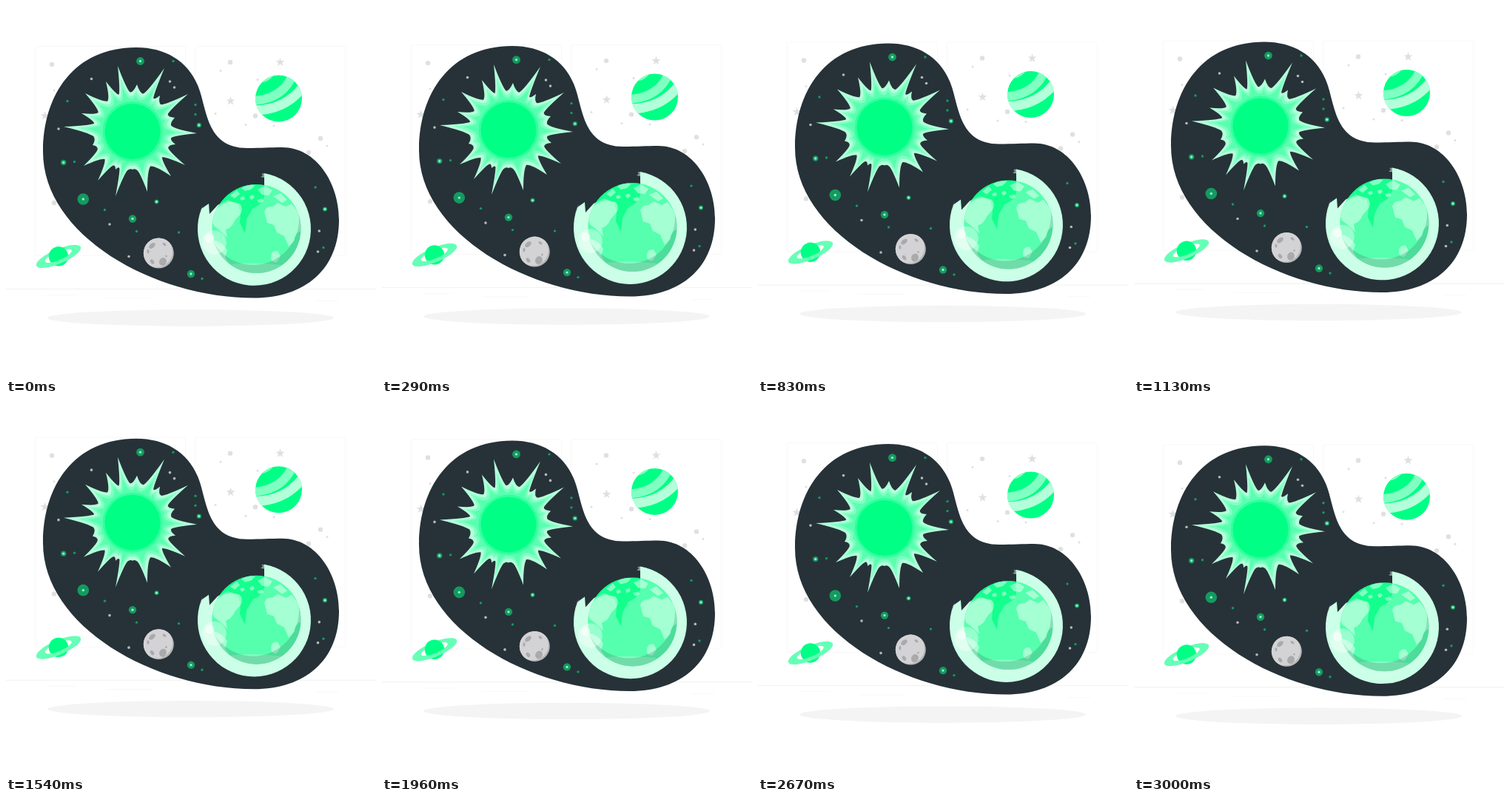
An HTML page that plays this animation: 500 px wide and 500 px high, repeating every 3040 ms.

```html
<!DOCTYPE html>
<html lang="en">
<head>
<meta charset="utf-8">
<title>Floating space scene</title>
<style>
html, body { margin: 0; width: 100%; height: 100%; overflow: hidden; background: #fff; }
svg { display: block; width: 100vw; height: 100vh; }
</style>
</head>
<body>
<svg viewBox="0 0 500 500">
  <defs>
    <clipPath id="earthClip"><circle cx="338.5" cy="301" r="60"/></clipPath>
    <clipPath id="planetClip"><circle cx="368.5" cy="125" r="31.5"/></clipPath>
    <clipPath id="moonClip"><circle cx="206.3" cy="334" r="20.5"/></clipPath>
    <clipPath id="frontClip"><rect x="-40" y="0" width="80" height="20"/></clipPath>
    <path id="glass" d="M264 274L274 267L275 281L286 269L300 262L314 268L317 280L316 293L323 307L325 288L333 274L343 268L349 258V226A76.5 76.5 0 1 1 264 274Z"/>
    <path id="ring" fill-rule="evenodd" d="M-32.5 0A32.5 9.7 0 1 1 32.5 0A32.5 9.7 0 1 1 -32.5 0ZM-19.5 -.5A19.5 5.6 0 1 0 19.5 -.5A19.5 5.6 0 1 0 -19.5 -.5Z"/>
  </defs>
  <g id="scene">
    <g fill="none" stroke="#f8f8f8">
      <rect x="39.5" y="54.5" width="203" height="283" rx="2"/>
      <rect x="255.5" y="54.5" width="203" height="283" rx="2"/>
      <path d="M0 382.5H500" stroke="#f0f0f0"/>
      <path d="M55 390.5H97M135 394.8H198M418 398.3H449"/>
    </g>
    <ellipse cx="249.5" cy="421.5" rx="193.5" ry="11.2" fill="#f4f4f4"/>
    <g id="pale" fill="#e0e0e0"></g>

    <path fill="#263238" d="M176 56C215 56 245 74 259 107C272 137 269 192 326 192C345 192 357 191 373 191C420 191 450 240 450 289C450 355 405 394.5 335 394.5C200 394.5 50 310 50 197C50 120 92 56 176 56Z"/>
    <g id="stars"></g>
    <g id="sun"></g>

    <g clip-path="url(#planetClip)" fill="none">
      <circle cx="368.5" cy="125" r="32" fill="#00ff85"/>
      <path d="M334 128Q374 126 388 92" stroke="#80ffc2" stroke-width="12"/>
      <path d="M334 141Q378 141 402 108" stroke="#b3ffda" stroke-width="13"/>
      <path d="M345 101Q353 100 360 92" stroke="#80ffc2" stroke-width="5"/>
    </g>

    <g transform="translate(71 338.3) rotate(-23)">
      <use href="#ring" fill="#66ffb6"/>
      <circle r="13.2" fill="#00ff85"/>
      <use href="#ring" fill="#66ffb6" clip-path="url(#frontClip)"/>
    </g>

    <g clip-path="url(#moonClip)">
      <circle cx="206.3" cy="334" r="21" fill="#b5b5b7"/>
      <circle cx="204" cy="332" r="21" fill="#d3d3d5"/>
      <g fill="#aaaaac">
        <ellipse cx="197.5" cy="324" rx="5" ry="3" transform="rotate(-40 197.5 324)"/>
        <ellipse cx="212" cy="345.5" rx="4.8" ry="5.6" transform="rotate(25 212 345.5)"/>
        <ellipse cx="197.5" cy="345.5" rx="2.3" ry="3.5" transform="rotate(-35 197.5 345.5)"/>
        <ellipse cx="192" cy="331.5" rx="1.5" ry="2.8"/>
        <ellipse cx="214" cy="322" rx="2.8" ry="1.6" transform="rotate(35 214 322)"/>
        <circle cx="216.5" cy="338" r="1.3"/>
      </g>
    </g>

    <use href="#glass" fill="#ccffe7"/>
    <path d="M349 226L345.5 226.5L347 229L344 231L349 232ZM264 274L266 269L263 279L262 282Z" fill="#8a9a95"/>
    <g clip-path="url(#earthClip)">
      <rect x="278" y="240" width="121" height="122" fill="#14ff8e"/>
      <g fill="#80ffc2">
        <path d="M276 283Q288 267 303 264L316 267Q321 274 317 281L309 290Q305 300 297 302L299 313L292 306L281 297Z"/>
        <path d="M349 278Q352 270 360 271L367 266L378 271L386 267L400 286V303Q389 307 390 317L382 325L376 311L366 306L362 296L353 293Z"/>
        <path d="M358 337Q360 330 367 331L371 338L366 346Q360 347 358 342Z"/>
        <path d="M279 316Q292 318 299 330L296 340L304 351L295 347L281 331Z"/>
        <path d="M318 246L327 241L337 242L331 248L323 250ZM340 248L350 243L360 249L355 256L346 255ZM361 257L371 253L380 262L373 266ZM303 256L312 249L316 254L309 260Z"/>
        <path d="M329 257L334 255L336 259L331 262ZM316 259L321 257L323 261L318 263ZM339 262L346 260L348 264L342 266Z"/>
        <path d="M302 349Q335 345 372 350L360 364H315Z" opacity=".55"/>
      </g>
      <use href="#glass" fill="#fff" opacity=".28"/>
      <path fill="#263238" fill-opacity=".17" fill-rule="evenodd" d="M270 230H410V370H270ZM272 288A62 62 0 1 0 396 288A62 62 0 1 0 272 288Z"/>
    </g>
    <circle cx="281.5" cy="319.5" r="16.3" fill="#fff" opacity=".38"/>
    <circle cx="275" cy="314" r="6.2" fill="#fff" opacity=".55"/>
  </g>
</svg>
<script>
const $ = id => document.getElementById(id);
const dot = (x, y, r, fill) => `<circle cx="${x}" cy="${y}" r="${r}"${fill ? ` fill="${fill}"` : ''}/>`;
const polar = (r, a) => [171 + r * Math.cos(a), 169.5 + r * Math.sin(a)];

function fivePoint(x, y) {
  const pts = [...Array(10).keys()].map(i => {
    const r = i % 2 ? 2.6 : 6.3, a = (i / 5 - .5) * Math.PI;
    return [x + r * Math.cos(a), y + r * Math.sin(a)];
  });
  return `<polygon points="${pts.join(' ')}"/>`;
}

$('pale').innerHTML =
  [[62, 79], [303, 76], [337, 148.5], [425, 179], [409, 198], [65, 266]].map(p => dot(...p, 3.2)).join('') +
  [[65, 114], [290, 87.5], [340, 99.5], [283, 145.5], [324, 160.5], [362, 162], [434, 189]].map(p => dot(...p, 1.5)).join('') +
  [[370.5, 76], [303.5, 128.5], [52.5, 148.5]].map(p => fivePoint(...p)).join('');

const glows = [[181.5, 74.5, 5.4], [104.3, 261, 7.8], [171, 287.5, 5.2], [250, 362, 5.2],
  [77.7, 211.5, 3.7], [260.8, 161, 3.2], [203.5, 264.5, 3], [431, 274.5, 3.1]];
const greens = [[226, 74.5], [83, 128.5], [256, 133.5], [256, 146.5], [92.5, 210.5], [133.5, 275.5],
  [176.5, 304.5], [233.5, 306], [265, 368.5], [418, 245], [429, 326.5]];
const grays = [[115.5, 98.5], [221.5, 102], [227.5, 110], [71, 166], [140, 295], [166, 338.5], [423.3, 304], [421.5, 332]];
$('stars').innerHTML =
  glows.map(([x, y, r]) => dot(x, y, r, '#149a60') + dot(x, y, 1.7, '#8cf5c3')).join('') +
  greens.map(p => dot(...p, 1.7, '#149a60')).join('') +
  grays.map(p => dot(...p, 1.8, '#b4b8ba')).join('');

// Sun flares: tips in clockwise order, joined by concave curves.
const tips = [[151, 81], [177, 106], [214, 84], [208, 121], [246, 119], [228, 151], [258, 172],
  [229, 187], [242, 215], [223, 230], [191, 251], [171, 221], [148, 257], [148, 221], [124, 236],
  [105, 216], [117, 188], [78, 163], [102, 145], [107, 118], [135, 102]]
  .map(([x, y]) => [Math.hypot(x - 171, y - 169.5), Math.atan2(y - 169.5, x - 171)]);

function flare(reach, valley, fill) {
  let d = '';
  tips.forEach(([r, a], i) => {
    const next = tips[(i + 1) % tips.length];
    const gap = (next[1] - a + 2 * Math.PI) % (2 * Math.PI);
    const out = R => valley - 3 + (R - valley) * .22;
    const tip = R => 38 + (R - 38) * reach;
    if (!i) d = 'M' + polar(tip(r), a);
    d += 'Q' + polar(out(tip(r)), a + gap * .25) + ' ' + polar(valley, a + gap / 2) +
         'Q' + polar(out(tip(next[0])), a + gap * .75) + ' ' + polar(tip(next[0]), next[1]);
  });
  return `<path d="${d}Z" fill="${fill}"/>`;
}

$('sun').innerHTML =
  flare(1, 53, '#b3ffda') + flare(.66, 48, '#80ffc2') + flare(.42, 44, '#59ffb0') +
  dot(171, 169.5, 40.5, '#33ff9d') + dot(171, 169.5, 37.5, '#00ff85');

// Linear rise and fall of 10 px; the lowest point comes 40 ms before the loop ends.
const LOOP = 3040, start = performance.now();
function draw(now) {
  const phase = (Math.max(0, now - start) + 40) % LOOP / LOOP;
  const lift = 10 * (1 - Math.abs(1 - 2 * phase));
  $('scene').setAttribute('transform', `translate(0 ${.26 - lift})`);
  requestAnimationFrame(draw);
}
draw(start);
</script>
</body>
</html>
```
